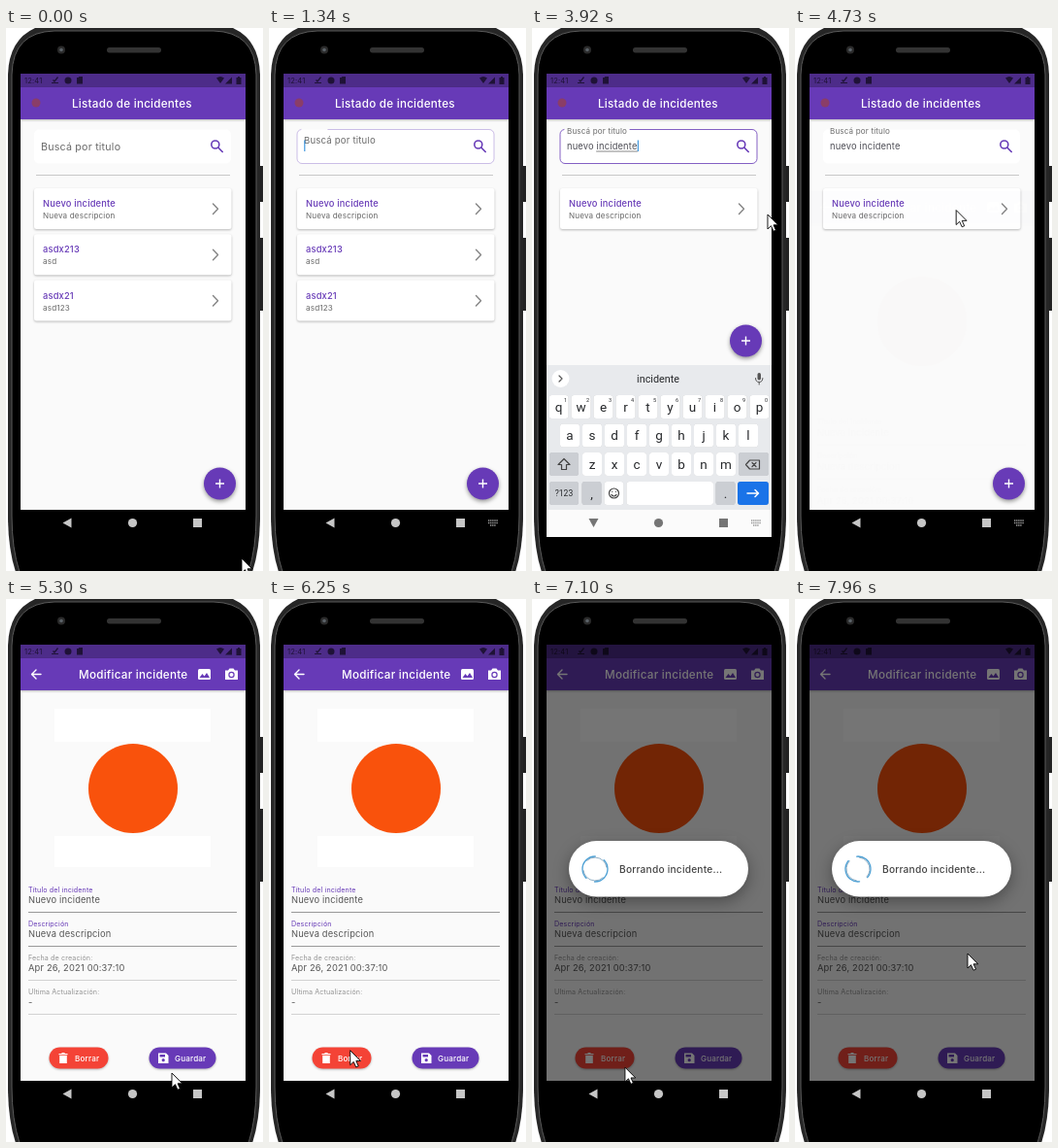
An HTML page that plays this animation: 265x559 px, repeating every 8000 ms.

```html
<!DOCTYPE html>
<html lang="es">
<head>
<meta charset="utf-8">
<title>Listado de incidentes</title>
<style>
html, body { margin: 0; width: 100%; height: 100%; overflow: hidden; background: #fff; }
svg { display: block; width: 100%; height: 100%; }
text { font-family: Inter, sans-serif; letter-spacing: .02em; white-space: pre; }
#keys text, #strip text { font-family: Roboto, sans-serif; letter-spacing: 0; text-anchor: middle; fill: #26282b; }
.title { font-size: 11.7px; font-weight: 500; fill: #fff; }
.head { font-size: 9.3px; font-weight: 500; fill: #673ab7; }
.sub { font-size: 8.1px; fill: #666; }
.label { font-size: 7.1px; }
.value { font-size: 9.3px; fill: #555; }
.btn { font-size: 8.1px; font-weight: 500; fill: #fff; }
.line { fill: none; stroke-linecap: round; stroke-linejoin: round; }
.shadow { filter: drop-shadow(0 1px 1px #0004); }
.lift { filter: drop-shadow(0 2px 2px #0006); }
</style>
</head>
<body>
<svg viewBox="0 0 265 559" xmlns="http://www.w3.org/2000/svg">
  <defs>
    <clipPath id="screen"><path d="M15 47H247V496H15z"/></clipPath>
    <clipPath id="page"><path d="M15 61H247V496H15z"/></clipPath>
  </defs>

  <!-- phone body -->
  <path d="M261 142h4v37h-4zM261 216h4v75h-4z" fill="#222"/>
  <path d="M10 560Q2 536 2 502V48Q3 12 30 0H234Q261 12 262 48V502Q262 536 254 560z" fill="#262626"/>
  <path d="M14 560Q6 536 6 502V48Q7 4 50 3H214Q257 4 258 48V502Q258 536 250 560" stroke="#5a5a5a"/>
  <circle cx="57" cy="22.5" r="4" fill="#2b2b2b"/>
  <circle cx="57" cy="22.5" r="1.8" fill="#5b6268"/>
  <rect x="104" y="20" width="56" height="5.5" rx="2.7" fill="#333"/>

  <g clip-path="url(#screen)">
    <path d="M15 47H247V496H15z" fill="#fafafa"/>
    <path d="M15 47H247V61H15z" fill="#4d2c89"/>
    <g fill="#1f1237">
      <text x="19" y="57" font-size="7.6">12:41</text>
      <path d="M47 57h7v-1h-7zM48 54l2 2 4-5-1-1-3 4-1-1z"/>
      <circle cx="64" cy="54" r="3.5"/>
      <path d="M73 51h1.5l1-1h3.5v7.500h-6zM217 51.500q4-3 8 0l-4 5.500zM226 57.500l7-7v7zM237.500 51h1.500v-1h2v1h1.500v7h-5z"/>
    </g>
    <path d="M15 61H247V94H15z" fill="#673ab7" class="shadow"/>

    <!-- list page -->
    <circle cx="31" cy="77" r="4.500" fill="#8a3d68"/>
    <text x="68" y="82" class="title">Listado de incidentes</text>
    <rect x="29" y="104.500" width="203" height="35" rx="5" fill="#fff"/>
    <path id="outline" class="line" stroke="#673ab7"/>
    <text id="hint" x="36" fill="#6b6b6b">Buscá por titulo</text>
    <text id="typed" x="36" y="125" font-size="9.3" fill="#4d4d55"></text>
    <path id="under" class="line" stroke="#555" stroke-width=".7"/>
    <path id="caret" d="M0 115.500V127" stroke="#2f8fdc" stroke-width="1.1"/>
    <g class="line" stroke="#673ab7" stroke-width="1.600">
      <circle cx="215.800" cy="120" r="4"/><path d="M219 123.200l4.200 4.300"/>
    </g>
    <path d="M31 151.500H231" stroke="#c8c8c8"/>
    <g id="cards"></g>
    <g id="fab">
      <circle cx="220.500" cy="469" r="16.500" fill="#673ab7" class="lift"/>
      <path d="M216 469h9M220.500 464.500v9" stroke="#fff" stroke-width="1.400"/>
    </g>

    <!-- keyboard -->
    <g id="keyboard">
      <path d="M15 347H247V496H15z" fill="#e8eaed"/>
      <g id="strip">
        <circle cx="29.500" cy="361" r="9" fill="#fff"/>
        <path id="arrow" class="line" stroke="#555" stroke-width="1.200"/>
        <g id="tools" class="line" stroke="#555" stroke-width="1.200">
          <circle cx="59" cy="360" r="3.300"/><path d="M61.500 362.500l3.500 3.500"/>
          <path d="M98 361v-5h-10v10h5zM98 361h-5v5M90.500 359h.5M95 359h.5"/>
          <path d="M155.500 357h9v9h-9zM158 355.500h4v2h-4zM158 361h4M158 363.500h3"/>
          <path d="M180.500 354v14" stroke="#ccc"/>
          <path d="M197 361h.1M201 361h.1M205 361h.1" stroke-width="2"/>
          <text x="126" y="364" font-size="8.500" font-weight="700" stroke="none">GIF</text>
        </g>
        <text id="guess" x="130" y="365" font-size="10.800"></text>
        <rect x="232.500" y="355" width="3.500" height="7.500" rx="1.700" fill="#555"/>
        <path d="M230.500 360.500q0 4 3.700 4t3.700-4M234.200 364.500v2.500" class="line" stroke="#555"/>
      </g>
      <g id="keys"></g>
      <g class="line" stroke="#444" stroke-width="1.200">
        <path d="M33 443.500l-6 6h3.500v5h5v-5h3.500z"/>
        <path d="M220.500 449.500l4-4.500h10v9h-10zM227 447.500l4 4M231 447.500l-4 4"/>
        <circle cx="84.500" cy="479" r="5"/><path d="M82 480.500q2.500 3 5 0M82.700 477.500h.1M86.300 477.500h.1"/>
        <path d="M222 479h11.500M230 475.500l3.500 3.500-3.500 3.500" stroke="#fff" stroke-width="1.500"/>
      </g>
    </g>

    <!-- detail page -->
    <g clip-path="url(#page)"><g id="detail">
      <path d="M15 61H247V496H15z" fill="#fafafa"/>
      <path d="M15 61H247V94H15z" fill="#673ab7" class="shadow"/>
      <path d="M36 77.500h-9M31 73l-4.500 4.500L31 82" class="line" stroke="#fff" stroke-width="1.400"/>
      <text x="75" y="82" class="title">Modificar incidente</text>
      <rect x="198" y="72" width="13" height="11" rx="1.500" fill="#fff"/>
      <path d="M199.500 81l3-4 2 2.500 2.500-3.500 3 5z" fill="#673ab7"/>
      <path d="M226 73.500h3l1.500-2h4l1.500 2h3v9.500h-13z" fill="#fff"/>
      <circle cx="232.500" cy="78" r="2.600" fill="none" stroke="#673ab7" stroke-width="1.200"/>
      <path d="M50 113H211V147H50zM50 244H211V276H50z" fill="#fff"/>
      <circle cx="131" cy="195" r="46" fill="#f9520c"/>
      <g id="fields"></g>
      <rect x="44.500" y="461.500" width="61" height="22" rx="11" fill="#f44336" class="shadow"/>
      <rect id="press" x="44.500" y="461.500" width="61" height="22" rx="11" fill="#fff"/>
      <path d="M54.500 468h2.500l1-1h2l1 1h2.500v1.200h-9zM55.200 470h7.600v8h-7.600z" fill="#fff"/>
      <text x="71" y="475.500" class="btn">Borrar</text>
      <rect x="147.500" y="461.500" width="69" height="22" rx="11" fill="#673ab7" class="shadow"/>
      <path d="M157 467.500h8l2.500 2.500v8h-10.500z" fill="#fff"/>
      <path d="M158.500 469h5.500v2.500h-5.500z" fill="#673ab7"/><circle cx="162.200" cy="474.700" r="1.600" fill="#673ab7"/>
      <text x="174" y="475.500" class="btn">Guardar</text>
    </g></g>

    <!-- progress dialog -->
    <path id="dim" d="M15 47H247V496H15z"/>
    <g id="dialog">
      <rect x="38" y="249" width="185" height="57.500" rx="28.700" fill="#fff" style="filter:drop-shadow(0 5px 8px #0005)"/>
      <g class="line">
        <circle id="ringA" cx="65" cy="278" r="13" stroke="#4a9fd4" stroke-width="1.300" stroke-dasharray="31 9.840"/>
        <circle id="ringB" cx="65" cy="278" r="12" stroke="#7fa3bd" stroke-width=".8" stroke-dasharray="26 11.700"/>
      </g>
      <text x="90" y="281.500" font-size="10.200" font-weight="500" fill="#444">Borrando incidente...</text>
    </g>
  </g>

  <!-- navigation bar -->
  <path id="nav" d="M15 496H247V524H15z"/>
  <g id="navIcons">
    <path id="back"/>
    <circle cx="130.500" cy="509.500" r="4.600"/>
    <path d="M193 505h9v9h-9z"/>
    <path id="kbIcon" d="M226 507h10M226 509.500h10M228 512h6" fill="none" stroke="#999" stroke-width="1.300" stroke-dasharray="1.400 .7"/>
  </g>
  <path id="mouse" d="M0 0V15l3.500-3.300 2.500 5.500 2.500-1-2.400-5.400h4.700z" fill="#fff" stroke="#000" stroke-width=".9"/>
</svg>

<script>
const $ = id => document.getElementById(id);
const set = (id, attrs) => { for (const k in attrs) $(id).setAttribute(k, attrs[k]); };
const show = (id, on) => { $(id).style.display = on ? '' : 'none'; };
const ramp = (t, a, b) => Math.min(1, Math.max(0, (t - a) / (b - a)));
const ease = (t, a, b) => { const p = ramp(t, a, b); return p * p * (3 - 2 * p); };

// static repeats
const cards = [['Nuevo incidente', 'Nueva descripcion'], ['asdx213', 'asd'], ['asdx21', 'asd123']];
$('cards').innerHTML = cards.map(([head, sub], i) => `
  <g id="card${i}" transform="translate(0 ${i * 47.3})">
    <rect x="29" y="165" width="203.5" height="42" rx="2.500" fill="#fff" class="shadow"/>
    <text x="38" y="184" class="head">${head}</text>
    <text x="38" y="196" class="sub">${sub}</text>
    <path d="M213.500 181l5 5.200-5 5.200" class="line" stroke="#858585" stroke-width="1.400"/>
  </g>`).join('');

const fields = [
  ['Título del incidente', 'Nuevo incidente', '#673ab7', '#999'],
  ['Descripción', 'Nueva descripcion', '#673ab7', '#999'],
  ['Fecha de creación:', 'Apr 26, 2021 00:37:10', '#929292', '#d2d2d2'],
  ['Ultima Actualización:', '-', '#929292', '#d2d2d2']];
$('fields').innerHTML = fields.map(([label, value, ink, rule], i) => `
  <g transform="translate(0 ${i * 35})">
    <text x="23" y="301.500" class="label" fill="${ink}">${label}</text>
    <text x="23" y="313" class="value">${value}</text>
    <path d="M23 322.500H238" stroke="${rule}"/>
  </g>`).join('');

const key = (x, y, w, char = '', fill = '#fff', size = 13.5) => `
  <rect x="${x}" y="${y}" width="${w}" height="24" rx="3" fill="${fill}" style="filter:drop-shadow(0 .7px 0 #0003)"/>
  <text x="${x + w / 2}" y="${y + 12 + size * .34}" font-size="${size}">${char}</text>`;
const row = (chars, x, y) => [...chars].map((c, i) => key(x + i * 23, y, 20, c)).join('');
const grey = '#cbced3';
$('keys').innerHTML = row('qwertyuiop', 17.5, 378) + row('asdfghjkl', 29, 407.5) + row('zxcvbnm', 52, 437)
  + [...'1234567890'].map((c, i) => `<text x="${34.5 + i * 23}" y="384.500" font-size="5.500">${c}</text>`).join('')
  + key(18, 437, 30, '', grey) + key(213, 437, 31, '', grey)
  + key(18, 467, 30, '?123', grey, 8.5) + key(51.5, 467, 20, ',', grey) + key(74.5, 467, 20)
  + key(97.5, 467, 89.5) + key(189.5, 467, 20, '.', grey) + key(212, 467, 32, '', '#1a73e8');

// pointer path: time, x, y
const stops = [[30, 243, 546], [450, 97, 125], [3919, 97, 125], [3920, 243, 192], [4250, 170, 186],
  [4950, 165, 188], [5300, 171, 488], [5490, 90, 482], [5800, 74, 455], [6300, 84, 465],
  [6900, 84, 465], [7200, 100, 488], [7650, 183, 380], [7960, 178, 365]];
function pointer(t) {
  let i = stops.findIndex(s => s[0] > t);
  if (i < 0) i = stops.length - 1;
  if (!i) return stops[0].slice(1);
  const [a, x, y] = stops[i - 1], [b, u, v] = stops[i], p = ease(t, a, b);
  return [x + (u - x) * p, y + (v - y) * p];
}

const phrase = 'nuevo incidente';
function typedCount(t) {
  if (t < 2230) return 0;
  if (t < 2800) return Math.min(5, 1 + Math.floor((t - 2230) / 104));
  return Math.min(15, 6 + Math.floor((t - 2800) / 73));
}

function draw(t) {
  // search field
  const float = ease(t, 1240, 1470);
  const focus = float * (1 - ramp(t, 4350, 4500));
  const text = phrase.slice(0, typedCount(t));
  const start = text.lastIndexOf(' ') + 1;
  set('outline', {
    d: `M${33 + 68 * float} 104.500H227a5 5 0 0 1 5 5v25a5 5 0 0 1-5 5H34a5 5 0 0 1-5-5v-25q0-4 4-5`,
    opacity: focus * .8 });
  set('hint', { y: 126 - 17 * float, 'font-size': 10.66 - 2.6 * float });
  $('typed').textContent = text;
  const width = n => n ? $('typed').getSubStringLength(0, n) : 0;
  const end = 36 + width(text.length);
  set('under', { d: `M${36 + width(start)} 127H${end}` });
  show('under', text.length > start && t < 4350);
  set('caret', { transform: `translate(${end + .8} 0)` });
  show('caret', t >= 1240 && t < 4350);
  show('card1', t < 2230);
  show('card2', t < 2230);

  // keyboard and navigation bar
  const open = ease(t, 1450, 1720) * (1 - ease(t, 4380, 4640));
  const light = t >= 1480 && t < 4600;
  set('keyboard', { transform: `translate(0 ${149 * (1 - open)})` });
  set('fab', { transform: `translate(0 ${-147 * open})` });
  const tools = t < 2300;
  show('tools', tools);
  set('arrow', { d: tools ? 'M31 358l-3 3 3 3' : 'M28 358l3 3-3 3' });
  $('guess').textContent = tools ? '' : text.slice(start);
  set('nav', { fill: light ? '#fbfbfb' : '#000' });
  set('navIcons', { fill: light ? '#757575' : '#c6c6c6' });
  set('back', { d: light ? 'M58.500 505h10l-5 9z' : 'M67.500 504.500v10l-9-5z' });
  show('kbIcon', t >= 1240 && t < 4760);

  // detail page
  const enter = ramp(t, 4730, 5030), slide = (1 - enter) ** 3;
  show('detail', enter > 0);
  set('detail', { opacity: enter, transform: `translate(0 ${108 * slide})` });
  set('press', { opacity: .22 * ramp(t, 6350, 6650) * (1 - ramp(t, 6850, 7100)) });

  // dialog
  const fade = ramp(t, 6730, 6880);
  set('dim', { opacity: .54 * fade });
  set('dialog', { opacity: fade });
  const turn = (t - 6730) * .36;
  set('ringA', { transform: `rotate(${turn} 65 278)` });
  set('ringB', { transform: `rotate(${-turn} 65 278)` });

  set('mouse', { transform: `translate(${pointer(t)})` });
  show('mouse', t < 1180 || t >= 3920);
}

function tick() {
  draw(performance.now() % 8000);
  requestAnimationFrame(tick);
}
tick();
</script>
</body>
</html>
```
